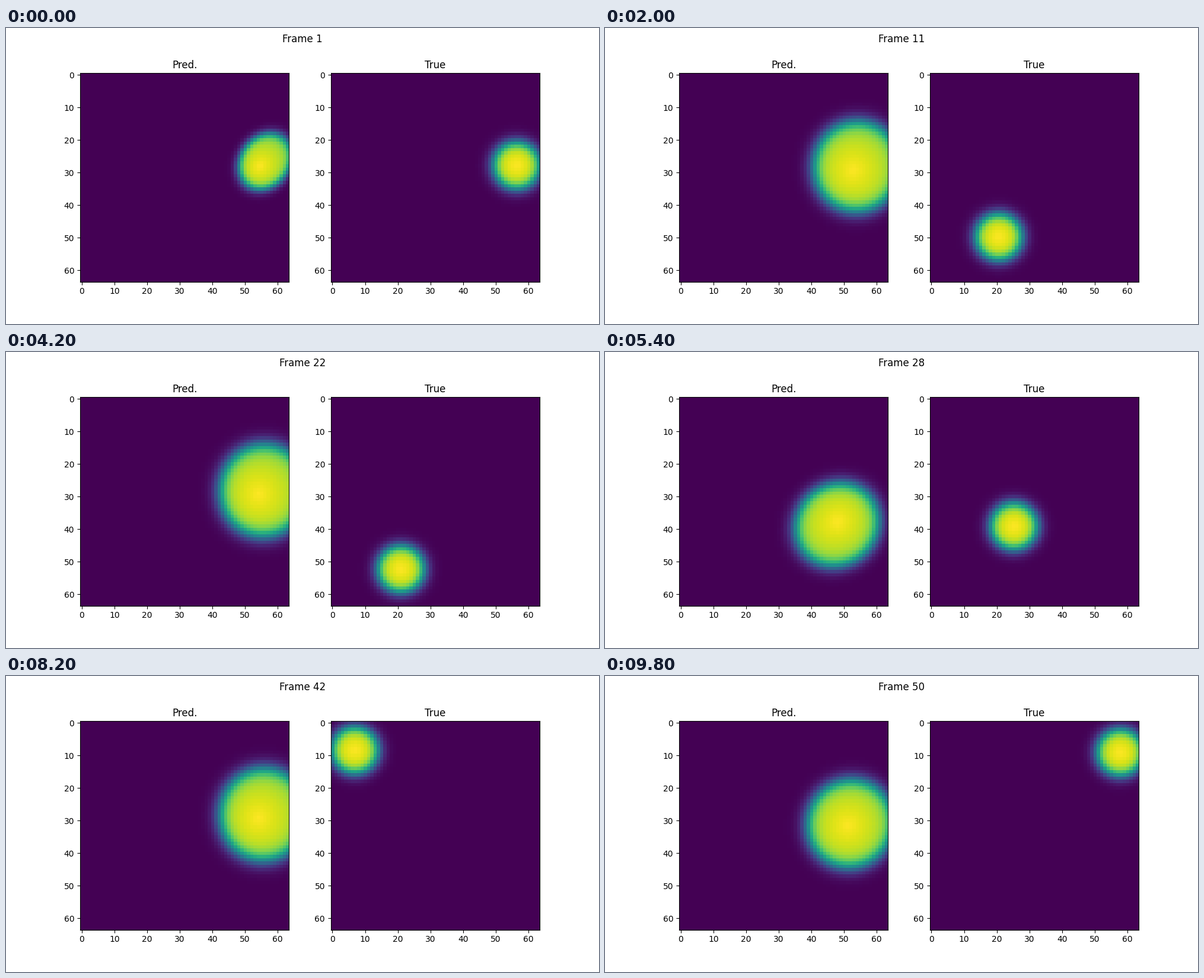
A matplotlib script that plays this animation: 1000 px wide and 500 px high, repeating every 10000 ms.

```python
import numpy as np
import matplotlib.pyplot as plt
from matplotlib.animation import FuncAnimation

plt.rcParams["font.family"] = "DejaVu Sans"

SIZE = 64
FRAMES = 50
START = np.array([56.3, 27.8])
STEP = np.array([-7.685, 2.19])
PERIOD = 20  # frames per swing of the predicted blob

Y, X = np.mgrid[:SIZE, :SIZE]


def bounce(pos):
    """Reflect an unbounded position between the walls."""
    wall = SIZE - 1
    pos = pos % (2 * wall)
    return wall - np.abs(pos - wall)


def falloff(q, edge, slope):
    """Soft step from 1 to 0 at the given relative radius."""
    return 1 / (1 + np.exp(slope * (q - edge)))


def swing(i, low):
    """Pulse that reaches 1 at frame low and in every period after it."""
    return (0.5 + 0.5 * np.cos(2 * np.pi * (i - low) / PERIOD)) ** 3.5


def true_ball(i):
    x, y = bounce(START + STEP * i)
    q = np.hypot(X - x, Y - y) / 10.9
    return (1 - 0.12 * q).clip(0) * falloff(q, 0.66, 10)


def pred_blob(i):
    # Sideways motion lags the vertical one, so the path is a loop
    side, drop = swing(i, 6.2), swing(i, 5.5)
    cx, cy = 56.3 - 9 * side, 25.8 + 15.6 * drop
    grow = 1 - 0.41 * np.exp(-i / 1.2)
    w, h = (18.2 - side) * grow, (19.2 - 2.2 * side) * grow
    tilt = 0.1 * drop + 0.45 * (1 - grow)

    def dist(x, y):
        a, b = (X - x) / w, (Y - y) / h
        return np.sqrt(a * a + b * b + 2 * tilt * a * b)

    # The brightest point is pulled a little towards the middle
    peak = dist(cx + 0.2 * (48 - cx), cy + 0.2 * (34 - cy))
    return (1 - 0.2 * peak).clip(0) * falloff(dist(cx, cy), 0.75, 14)


fig, axes = plt.subplots(1, 2, figsize=(10, 5), dpi=100)
heading = fig.suptitle("Frame 1", fontsize=12)
panels = []
for ax, name, field in zip(axes, ("Pred.", "True"), (pred_blob, true_ball)):
    ax.set_title(name, fontsize=12)
    image = ax.imshow(field(0), cmap="viridis", vmin=0, vmax=1,
                      interpolation="nearest")
    ax.set_xticks(range(0, SIZE, 10))
    ax.set_yticks(range(0, SIZE, 10))
    panels.append((image, field))


def update(i):
    heading.set_text(f"Frame {i + 1}")
    for image, field in panels:
        image.set_data(field(i))
    return [heading] + [image for image, _ in panels]


anim = FuncAnimation(fig, update, frames=FRAMES, interval=200,
                     repeat=True, repeat_delay=0, blit=False)
plt.show()
```
